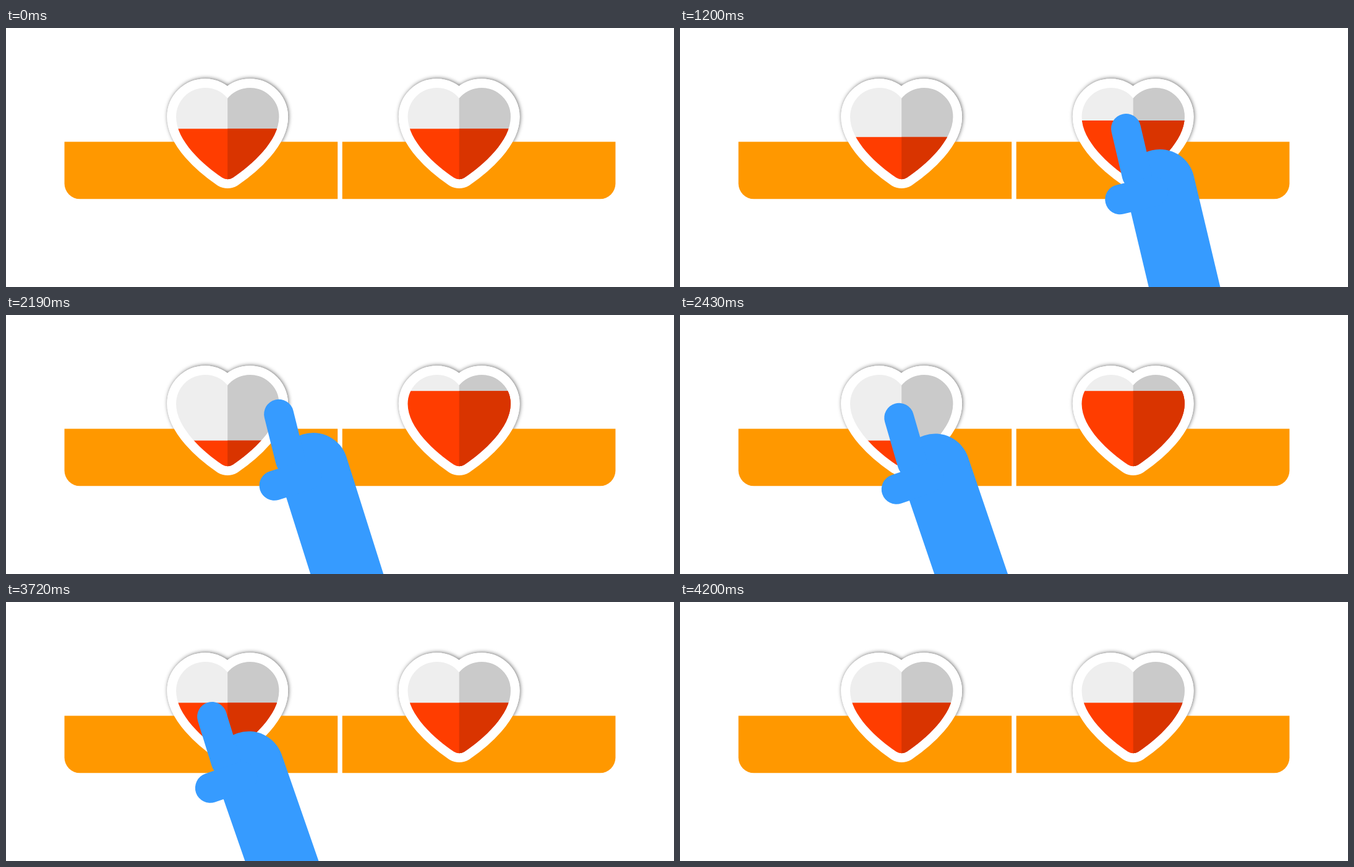
Recreate the animation shown at these times as an HTML page with a canvas. Size 1080 px wide and 420 px high, loop 4560 ms.

```html
<!DOCTYPE html>
<html lang="en">
<head>
<meta charset="utf-8">
<title>Two hearts</title>
<style>
html, body { margin: 0; width: 100%; height: 100%; overflow: hidden; background: #fff; }
canvas { display: block; width: 1080px; height: 420px; }
</style>
</head>
<body>
<canvas id="stage" width="1080" height="420"></canvas>
<script>
const ctx = document.getElementById('stage').getContext('2d');
const LOOP = 4560, TICK = 30;
const MID = 163.4, STEP = 13.4;
const HEARTS = [358.2, 732.7];
const UP = [810, 1230, 1620], DOWN = [2670, 3090, 3510];
const SHOULDER = [1618, 3804];

// Joints of the hand: pose on the right heart, pose on the left heart, lift while travelling
const JOINTS = {
  tip:     [[721, 163], [342.5, 170], [0, -8.5]],
  knuckle: [[738.5, 238], [365, 243], [-3, -7]],
  palm:    [[776, 253], [402, 250], [-3, -4]],
  thumb:   [[711.5, 278], [339.5, 285.5], [-3, -8]]
};
const ENTER = [65, 300], LEAVE = [-160, 272];

const clamp = v => Math.min(1, Math.max(0, v));
const span = (t, start, length) => clamp((t - start) / length);

// cubic-bezier(.25, .1, .25, 1)
function ease(x) {
  if (x <= 0 || x >= 1) return clamp(x);
  let lo = 0, hi = 1, s = 0.5;
  for (let i = 0; i < 24; i++) {
    s = (lo + hi) / 2;
    if (0.75 * s - 0.75 * s * s + s ** 3 < x) lo = s; else hi = s;
  }
  return 0.3 * s * (1 - s) ** 2 + 3 * s * s * (1 - s) + s ** 3;
}

function heartPath(cx) {
  const h = new Path2D();
  const r = 47, lobe = 36.2, edge = lobe + r;
  const notch = Math.acos(lobe / r);
  h.moveTo(cx, 245.3);
  h.quadraticCurveTo(cx - 4, 245.3, cx - 8.5, 242.8);
  h.bezierCurveTo(cx - 38.7, 222.3, cx - edge, 183.3, cx - edge, 144);
  h.arc(cx - lobe, 144, r, Math.PI, -notch);
  h.arc(cx + lobe, 144, r, Math.PI + notch, 0);
  h.bezierCurveTo(cx + edge, 183.3, cx + 38.7, 222.3, cx + 8.5, 242.8);
  h.quadraticCurveTo(cx + 4, 245.3, cx, 245.3);
  h.closePath();
  return h;
}
const paths = HEARTS.map(heartPath);

function rim(path) {
  ctx.strokeStyle = '#fff';
  ctx.lineWidth = 29.4;
  ctx.lineJoin = 'round';
  ctx.stroke(path);
}

function shadow(path) {
  ctx.save();
  ctx.shadowColor = 'rgba(0,0,0,.55)';
  ctx.shadowBlur = 6;
  ctx.shadowOffsetX = 1;
  ctx.shadowOffsetY = -0.7;
  rim(path);
  ctx.restore();
}

function bar(x, radii) {
  ctx.fillStyle = '#ff9800';
  ctx.beginPath();
  ctx.roundRect(x, 184.4, 441.7, 92.9, radii);
  ctx.fill();
}

function heart(i, level) {
  const cx = HEARTS[i];
  rim(paths[i]);
  ctx.save();
  ctx.clip(paths[i]);
  const fill = (color, x, y) => {
    ctx.fillStyle = color;
    ctx.fillRect(x, y, cx + 90 - x, 250 - y);
  };
  fill('#eee', cx - 90, 90);
  fill('#cacaca', cx, 90);
  fill('#ff3d00', cx - 90, level);
  fill('#d93400', cx, level);
  ctx.restore();
}

function limb(a, b, width) {
  ctx.lineWidth = width;
  ctx.beginPath();
  ctx.moveTo(...a);
  ctx.lineTo(...b);
  ctx.stroke();
}

function hand(t) {
  if (t < 450 || t >= 4200) return;
  const inn = 1 - ease(span(t, 415, 345));
  const out = span(t, 3690, 510);
  const go = ease(span(t, 1871, 720));
  const lift = 2 * Math.sqrt(go * (1 - go));
  const at = ([from, to, hop]) => [0, 1].map(i =>
    from[i] + (to[i] - from[i]) * go + hop[i] * lift + ENTER[i] * inn + LEAVE[i] * out);

  const tip = at(JOINTS.tip), knuckle = at(JOINTS.knuckle);
  const palm = at(JOINTS.palm), thumb = at(JOINTS.thumb);
  const tilt = Math.atan2(SHOULDER[0] - palm[0], SHOULDER[1] - palm[1]);

  ctx.strokeStyle = '#369bff';
  ctx.lineCap = 'round';
  limb(palm, SHOULDER, 112.5);
  limb(tip, knuckle, 48);
  limb(thumb, [thumb[0] + 55 * Math.cos(tilt), thumb[1] - 55 * Math.sin(tilt)], 48.5);
}

function draw(t) {
  ctx.fillStyle = '#fff';
  ctx.fillRect(0, 0, 1080, 420);
  const passed = list => list.filter(at => t >= at).length;
  const shift = (passed(UP) - passed(DOWN)) * STEP;
  paths.forEach(shadow);
  bar(94.5, [0, 0, 0, 25]);
  bar(543.7, [0, 0, 25, 0]);
  heart(0, MID + shift);
  heart(1, MID - shift);
  hand(t);
}

const begin = performance.now();
function frame() {
  const t = (performance.now() - begin) % LOOP;
  draw(Math.floor(t / TICK) * TICK);
  requestAnimationFrame(frame);
}
frame();
</script>
</body>
</html>
```
